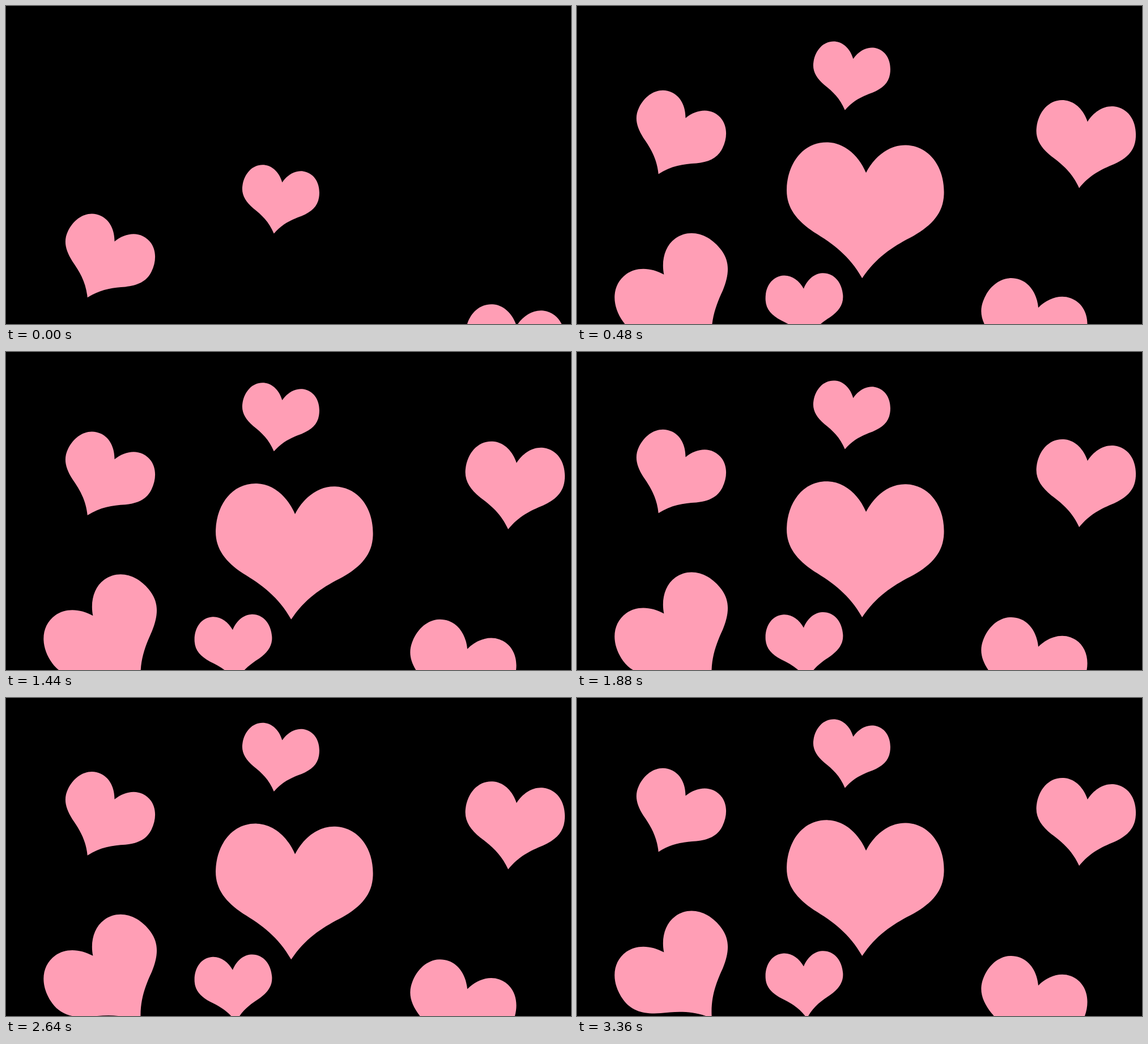
These frames come from a looping animation (997x561 px, 3.4 s). An HTML page:

```html
<!DOCTYPE html>
<html lang="en">
<head>
<meta charset="utf-8">
<title>Rising hearts</title>
<style>
  html, body { margin: 0; width: 100%; height: 100%; overflow: hidden; background: #000; }
  svg { display: block; width: 100%; height: 100%; fill: #ff9eb5; }
</style>
</head>
<body>
<svg viewBox="0 0 997 561">
  <defs>
    <!-- cleft at the origin, tip straight below -->
    <path id="heart" d="M0 0C14 -30 40 -51.3 69 -51.3C111 -51.3 138.8 -14 138.8 33C138.8 66 120 88 88 108C54 127 24 147 0 186C-24 147 -54 127 -88 108C-120 88 -138.8 66 -138.8 33C-138.8 -14 -111 -51.3 -69 -51.3C-40 -51.3 -14 -30 0 0Z"/>
  </defs>
  <g class="wave">
    <use href="#heart" transform="translate(487.4 68.3) rotate(9.2) scale(.492)"/>
    <use href="#heart" transform="translate(191.5 172.6) rotate(25.8) scale(.59)"/>
  </g>
  <g class="wave">
    <use href="#heart" transform="translate(900.9 179.1) rotate(7.2) scale(.634)"/>
    <use href="#heart" transform="translate(153.4 448.6) rotate(-36) scale(.773)"/>
  </g>
  <g class="wave">
    <use href="#heart" transform="translate(510 269.2) rotate(2.1)"/>
    <use href="#heart" transform="translate(400 473.6) rotate(-3.6) scale(.493)"/>
  </g>
  <g class="wave">
    <use href="#heart" transform="translate(814 507.2) rotate(20) scale(.688)"/>
  </g>
</svg>
<script>
  const LOOP = 3400, STEP = 40;
  const DRIFT = 0.0087;      // px per ms, slow float upwards
  const RISE = 71.2;         // px per tick while entering
  const TICK = 1000 / 30;
  const waves = document.querySelectorAll('.wave');

  function draw(now) {
    const t = Math.floor((now % LOOP) / STEP) * STEP;
    const tick = Math.round(t / TICK);
    const drift = (LOOP - STEP - t) * DRIFT;
    waves.forEach((wave, i) => {
      const left = Math.max(0, 3 + 2 * i - tick);
      wave.setAttribute('transform', `translate(0 ${drift + left * RISE})`);
    });
  }

  const start = performance.now();
  function loop() {
    draw(performance.now() - start);
    requestAnimationFrame(loop);
  }
  loop();
</script>
</body>
</html>
```
